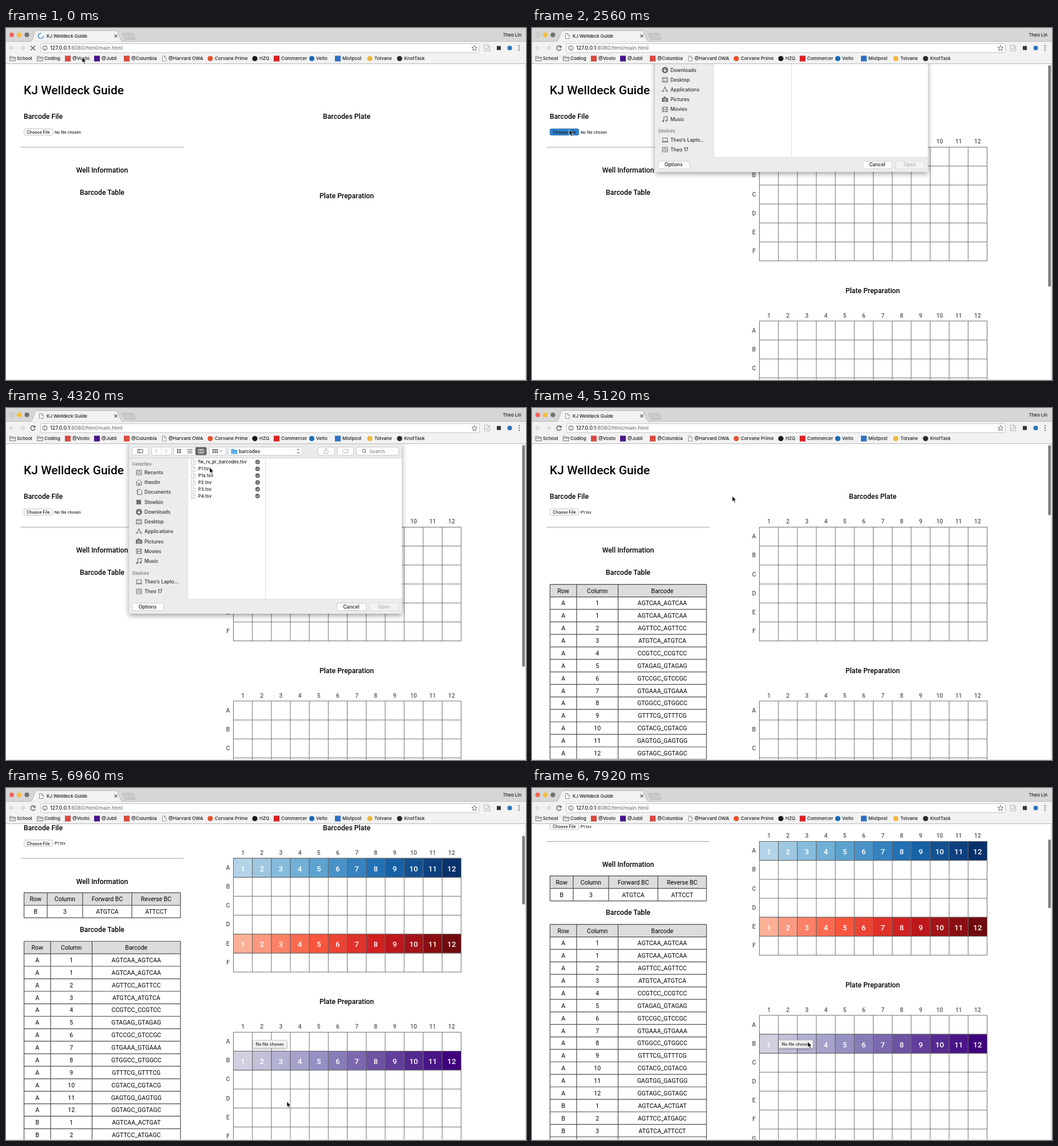
These frames come from a looping animation (909 by 616 pixels, 8000 ms). An HTML page:

```html
<!DOCTYPE html>
<html lang="en">
<head>
<meta charset="utf-8">
<title>KJ Welldeck Guide</title>
<style>
html, body { margin: 0; height: 100%; overflow: hidden; background: #fff; }
svg { display: block; width: 909px; height: 616px; }
text { font-family: Inter, "Open Sans", sans-serif; white-space: pre; }
.page { font-family: Roboto, sans-serif; }
.mid { text-anchor: middle; }
.end { text-anchor: end; }
</style>
</head>
<body>
<svg id="stage" viewBox="0 0 909 616"></svg>
<script>
const LOOP = 8000;
const LOADED = 400, PRESS = 2320, OPEN = 2400, LISTED = 2800, CLOSE = 4560,
      PARSED = 4880, TIP = 5760, PICK = 6120;

// ---- drawing helpers ----
const text = (x, y, s, size, cls = '', fill = '#1c1c1c', weight = 500) =>
  `<text x="${x}" y="${y}" class="${cls}" font-size="${size}" fill="${fill}" font-weight="${weight}">${s}</text>`;
const rect = (x, y, w, h, fill, stroke = 'none', r = 0) =>
  `<rect x="${x}" y="${y}" width="${w}" height="${h}" rx="${r}" fill="${fill}" stroke="${stroke}"/>`;
const path = (d, stroke, width = 1, fill = 'none') =>
  `<path d="${d}" stroke="${stroke}" stroke-width="${width}" fill="${fill}"/>`;
const circle = (x, y, r, fill, stroke = 'none') =>
  `<circle cx="${x}" cy="${y}" r="${r}" fill="${fill}" stroke="${stroke}"/>`;
const group = (id, body) => `<g id="${id}">${body}</g>`;
const heading = (x, y, s, cls = 'page mid') => text(x, y, s, 12.25, cls, '#000');
const folder = (x, y, fill, stroke) =>
  path(`M${x} ${y}v-8h4l1 1.5h5v6.5zM${x} ${y - 5}h10`, stroke, 0.8, fill);
const sheetOfPaper = (x, y, w, h, stroke = '#777') =>
  path(`M${x} ${y}h${w - 3}l3 3v${h - 3}h${-w}zM${x + w - 3} ${y}v3h3`, stroke, 0.8, '#fff');

// ---- plates ----
const PITCH = 33.17, LEFT = 397.5;
const BLUES = [[180, 211, 232], [98, 168, 211], [28, 108, 178], [8, 48, 107]];
const REDS = [[253, 176, 150], [252, 92, 64], [205, 26, 30], [112, 10, 14]];
const PURPLES = [[208, 208, 224], [155, 152, 198], [104, 76, 160], [63, 0, 125]];

function ramp(stops, i) {
  const p = i / 11 * 3, k = Math.min(2, Math.floor(p)), f = p - k;
  return `rgb(${stops[k].map((c, j) => Math.round(c + (stops[k + 1][j] - c) * f))})`;
}

function plate(top, rows) {
  let s = '', d = '';
  for (let c = 0; c <= 12; c++) {
    d += `M${LEFT + c * PITCH} ${top}v${rows * PITCH}`;
    if (c < 12) s += text(LEFT + (c + 0.5) * PITCH, top - 6.3, c + 1, 10.3, 'page mid', '#555');
  }
  for (let r = 0; r <= rows; r++) {
    d += `M${LEFT} ${top + r * PITCH}h${12 * PITCH}`;
    if (r < rows) s += text(388, top + r * PITCH + 19.8, 'ABCDEFGH'[r], 10.3, 'page mid', '#555');
  }
  return s + path(d, '#707070');
}

function wells(top, row, stops) {
  let s = '';
  for (let c = 0; c < 12; c++) {
    const x = LEFT + c * PITCH, y = top + row * PITCH;
    s += rect(x, y, PITCH, PITCH, ramp(stops, c), '#666') +
      text(x + PITCH / 2, y + 22.6, c + 1, 13.4, 'page mid', '#fff');
  }
  return s;
}

// ---- tables ----
const ROW = 21.87;

function table(top, edges, rows, count = rows.length) {
  const right = edges[edges.length - 1];
  let s = rect(edges[0], top, right - edges[0], ROW, '#dcdcdf'), d = '';
  for (const x of edges) d += `M${x} ${top}v${count * ROW}`;
  for (let r = 0; r <= count; r++) d += `M${edges[0]} ${top + r * ROW}H${right}`;
  rows.forEach((row, r) => row.forEach((v, c) => {
    s += text((edges[c] + edges[c + 1]) / 2, top + r * ROW + 14.9, v, 10.55, 'page mid', '#000', 400);
  }));
  return s + path(d, '#4c4c4c', 1.2);
}

const codes = ('AGTCAA AGTTCC ATGTCA CCGTCC GTAGAG GTCCGC GTGAAA GTGGCC ' +
  'GTTTCG CGTACG GAGTGG GGTAGC').split(' ');
const barcodes = [
  ['Row', 'Column', 'Barcode'],
  ['A', 1, 'AGTCAA_AGTCAA'],
  ...codes.map((c, i) => ['A', i + 1, c + '_' + c]),
  ...['ACTGAT', 'ATGAGC', 'ATTCCT'].map((c, i) => ['B', i + 1, codes[i] + '_' + c])
];

// ---- page ----
const page =
  text(31, 116, 'KJ Welldeck Guide', 21, 'page', '#000') +
  heading(31, 159, 'Barcode File', 'page') +
  heading(595.5, 159, 'Barcodes Plate') +
  `<rect id="choose" x="31.5" y="176.5" width="50" height="11" rx="2"/>` +
  text(56.5, 185, 'Choose File', 7.2, 'mid', '#111') +
  `<text id="file" x="85" y="184.8" font-size="6.7" font-weight="500" fill="#111"></text>` +
  path('M25.5 208.5H310.5', '#a6a6a6') +
  heading(168, 253, 'Well Information') +
  group('prep', heading(595.5, 298, 'Plate Preparation')) +
  group('plates', plate(208.5, 6) + plate(512.8, 8)) +
  group('picked',
    wells(208.5, 0, BLUES) + wells(208.5, 4, REDS) + wells(512.8, 1, PURPLES) +
    table(268.8, [31.5, 72, 134, 220, 305],
      [['Row', 'Column', 'Forward BC', 'Reverse BC'], ['B', 3, 'ATGTCA', 'ATTCCT']])) +
  group('codes', heading(168, 292, 'Barcode Table') +
    group('rows', table(308.7, [31.5, 78, 150.5, 305], barcodes, 24)));

// ---- file sheet ----
const G = '#6c6c6c';
const button = (x, y, w, h) => rect(x + 0.5, y + 0.5, w, h, '#fdfdfd', '#cfcfcf', 2.5);
const box = (y, d) => path(`M228 ${y - 4}h9v8h-9z` + d, G, 1);
const places = [
  ['Recents', y => box(y, `M228 ${y + 1}h9M230 ${y - 2}h5`)],
  ['theolin', y => path(`M227 ${y}l5.5 -5l5.5 5M228.5 ${y - 1}v6h8v-6M231.5 ${y + 5}v-4h2v4`, G)],
  ['Documents', y => path(`M227.5 ${y - 3}h2v7h5M230 ${y - 5}h5l2.5 3v6h-7.5z`, G)],
  ['Stowbin', y => rect(228, y - 4, 8, 8, G)],
  ['Downloads', y => circle(232.5, y, 5.5, G) + path(`M232.5 ${y - 3}v5.5M230 ${y}l2.5 2.5l2.5 -2.5`, '#fff', 1.2)],
  ['Desktop', y => box(y, `M228 ${y - 2}h9M228 ${y + 2}h9`)],
  ['Applications', y => path(`M228.5 ${y + 4}l4 -9l4 9M226.5 ${y + 2}h4M233 ${y + 2}h5`, G, 1.1)],
  ['Pictures', y => rect(227, y - 3, 11, 7, G, 'none', 1) + rect(230, y - 5, 4, 3, G) + circle(232.5, y + 0.5, 2, 'none', '#eee')],
  ['Movies', y => box(y, `M230 ${y - 4}v8M235 ${y - 4}v8M230 ${y}h5`)],
  ['Music', y => path(`M230.5 ${y + 3}v-7l6 -1v7`, G, 1.2) + circle(229.3, y + 3.2, 1.7, G) + circle(235.3, y + 2.3, 1.7, G)]
];
const devices = [
  ['Theo’s Lapto...', y => path(`M228.5 ${y - 3}h8v6h-8zM226.5 ${y + 4}h12`, G)],
  ['Theo 17', y => box(y, `M228 ${y + 1}h9M230 ${y - 2}h5`)]
];
const sideList = (items, top) => items.map(([name, icon], i) => {
  const y = top + i * 17.22;
  return icon(y) + text(242, y + 3, name, 8.5, '', '#333');
}).join('');

const files = ['fw_rv_pr_barcodes', 'P1', 'P1a', 'P2', 'P3', 'P4'].map((name, i) => {
  const y = 94.5 + i * 11.9;
  return sheetOfPaper(323.5, y - 4.5, 7.5, 9, '#bbb') +
    path(`M325 ${y - 1}h4M325 ${y + 1}h4M325 ${y + 3}h4`, '#ccc', 0.6) +
    text(336, y + 2.9, name + '.tsv', 7.8) + circle(439.8, y, 4, '#6a6a6a') +
    path(`M438 ${y}l1.5 1.5l2.3 -3`, '#fff', 0.9);
}).join('');

const sheet =
  `<rect x="215" y="60" width="477" height="300" fill="#ececec" filter="url(#shadow)"/>` +
  rect(215, 64, 477, 24, '#eaeaea') + rect(318, 88, 374, 247, '#fff') +
  path('M215 87.5H692', '#d2d2d2') +
  path('M317.5 88V335M453.5 88V335M318 334.5H692', '#dedede') +
  button(220, 68, 28, 14) + path('M230 72.5h9v6h-9zM233 72.5v6', '#555') +
  button(254, 68, 35, 14) + path('M271.5 69v13', '#ddd') +
  path('M264.5 72.5l-3 3l3 3M278.5 72.5l3 3l-3 3', '#999') +
  button(293, 68, 57, 14) + rect(331, 68.5, 19.5, 14, '#666', 'none', 2) +
  [299, 303].map(x => [72, 76].map(y => rect(x, y, 2.7, 2.7, '#555')).join('')).join('') +
  path('M317 72.5h9M317 75.5h9M317 78.5h9', '#555') +
  path('M336.5 72.5h9v6.5h-9zM339.5 72.5v6.5M342.5 72.5v6.5', '#fff', 0.9) +
  button(355, 68, 29, 14) +
  [361, 364.5, 368].map(x => [72, 76].map(y => rect(x, y, 2.4, 2.8, '#555')).join('')).join('') +
  path('M374 74.5l2 2l2 -2', '#555') +
  button(388, 68, 129, 14) + folder(394, 80, '#62b4e8', '#4b9bd0') +
  text(407, 78.7, 'barcodes', 8.3) +
  path('M509 74l2 -2.2l2 2.2M509 77l2 2.2l2 -2.2', '#444') +
  button(545, 68, 29, 14) + path('M557.5 74h-1.5v5.5h7v-5.5h-1.5M559.5 77v-6.5l-2 2M559.5 70.5l2 2', '#aaa', 0.9) +
  button(579, 68, 28, 14) + path('M588 75.5l2.5 -3h7.5v6h-7.5z', '#aaa', 0.9) +
  button(612, 68, 74, 14) + circle(626, 75, 2.7, 'none', '#666') + path('M628 77l2 2.2', '#666') +
  text(635, 78.5, 'Search', 8.2, '', '#888') +
  text(221, 101, 'Favorites', 7.5, '', '#808080', 600) + sideList(places, 113) +
  text(221, 291.7, 'Devices', 7.5, '', '#808080', 600) + sideList(devices, 303.8) +
  button(220, 341, 55, 13) + text(247.5, 350.6, 'Options', 8.5, 'mid') +
  button(578, 341, 51, 13) + text(603.5, 350.6, 'Cancel', 8.5, 'mid') +
  rect(635.5, 341.5, 50, 13, '#f3f3f3', '#dedede', 2.5) + text(660.5, 350.6, 'Open', 8.5, 'mid', '#b0b0b0') +
  group('files', files);

// ---- browser frame ----
const dot = (x, fill) => circle(x, 53.5, 4.6, fill);
const block = (x, fill) => rect(x - 5, 48.5, 10, 10, fill);
const marks = [
  [19, 'School', folder(6.5, 57.5, '#e4e4e4', '#666')],
  [67, 'Coding', folder(54.5, 57.5, '#e4e4e4', '#666')],
  [116, '@Vosto', block(108, '#d84a3e')],
  [167, '@Jubli', block(159, '#4a148c')],
  [219, '@Columbia', block(211, '#d84a3e')],
  [284, '@Harvard OWA', sheetOfPaper(273.5, 49, 6.5, 9)],
  [365, 'Corvane Prime', dot(357, '#e8502c')],
  [443, 'HZQ', dot(435, '#1a1a1a')],
  [481, 'Commercer', block(473, '#dc2222')],
  [542, 'Velto', dot(534.5, '#1b6cb5')],
  [588, 'Mistpost', block(580, '#2f72c4')],
  [644, 'Tolvane', dot(636, '#f0b83c')],
  [696, 'KnotTask', dot(688, '#2a2a2a')]
].map(([x, s, icon]) => icon + text(x, 56.4, s, 8.1)).join('');

const frame =
  rect(0, 0, 909, 24, '#d6d6d6') + rect(0, 23.5, 909, 39, '#f2f2f2') +
  path('M0 23.5H909', '#bcbcbc') + path('M0 62.5H909', '#b9b9b9') +
  path('M42 24C48 23 49 4.5 54 4.5H192C197 4.5 198 23 205 24z', '#b0b0b0', 0.9, '#f2f2f2') +
  path('M43 24.2H204', '#f2f2f2', 1.4) +
  path('M204 9.5h16q2 0 3 3l2.5 7h-16q-2 0 -3 -3z', '#aaa', 0.8, '#cbcbcb') +
  `<circle id="shut" cx="10" cy="12" r="4"/>` + circle(23, 12, 4, '#f8bd3c') + circle(36.5, 12, 4, '#707070') +
  `<path id="spin" d="M65.5 14A4.6 4.6 0 1 1 61.5 9.2" fill="none" stroke="#4b90cf" stroke-width="1.5"/>` +
  group('tabIcon', sheetOfPaper(58.5, 9.5, 6.5, 9)) +
  text(71, 16.7, 'KJ Welldeck Guide', 7.9) +
  path('M189.5 11.5l5 5m0 -5l-5 5', '#555', 1.1) +
  text(901, 14.6, 'Theo Lin', 7.9, 'end') +
  path('M14.5 35H6M10 31l-4 4l4 4M24 35h8.5M28.5 31l4 4l-4 4', '#cfcfcf', 1.3) +
  group('stop', path('M43 31l8 8m0 -8l-8 8', '#555', 1.3)) +
  group('reload', path('M50.5 33A4 4 0 1 0 51 36.5', '#555', 1.3) + path('M51.5 30.5v4h-4z', 'none', 0, '#555')) +
  rect(60.5, 27.5, 767, 15.5, '#fff', '#c4c4c4', 2) +
  circle(68, 35, 4, 'none', '#555') + path('M68 34.5v3M68 32.3v1.2', '#555', 1.1) +
  text(77, 38.3, '127.0.0.1<tspan fill="#777">:8080/html/main.html</tspan>', 8.9) +
  path('M819 30.5l1.3 3.1l3.3 .3l-2.5 2.2l.8 3.2l-2.9 -1.7l-2.9 1.7l.8 -3.2l-2.5 -2.2l3.3 -.3z', '#555', 0.9) +
  sheetOfPaper(836.5, 30, 9, 10, '#999') + path('M838 35h6M838 37h6', '#aaa', 0.9) +
  rect(858, 31.5, 7, 7, '#333') + circle(880.5, 35, 4, '#2c74b8') +
  [31, 35, 39].map(y => circle(897, y, 1.1, '#555')).join('') + marks;

const tooltip = `<g filter="url(#soft)">${rect(431.5, 441.5, 59.5, 13.5, '#f1f1f1', '#cacaca', 1)}</g>` +
  text(461.2, 451, 'No file chosen', 7.1, 'mid');

document.getElementById('stage').innerHTML =
  `<defs><filter id="shadow" x="-10%" y="-10%" width="120%" height="125%">
    <feDropShadow dx="0" dy="3" stdDeviation="5" flood-opacity=".4"/></filter>
    <filter id="soft" x="-20%" y="-50%" width="140%" height="220%">
    <feDropShadow dx="0" dy="1.5" stdDeviation="1.5" flood-opacity=".3"/></filter></defs>` +
  group('page', page) +
  `<rect id="thumb" x="902.3" width="4.8" rx="2.4" fill="#7f7f7f"/>` +
  path('M908.5 63V616', '#c4c4c4') + path('M0 615.5H909', '#dedede') +
  group('sheet', sheet) + frame + group('tip', tooltip) +
  group('cursor', path('M0 0V9.8L2.2 7.8L3.9 11.6L5.6 10.9L4 7.2H7z', '#fff', 0.8, '#000'));

// ---- motion ----
const $ = {};
document.querySelectorAll('#stage [id]').forEach(el => $[el.id] = el);
const show = (el, on) => el.style.display = on ? '' : 'none';
const move = (el, x, y) => el.setAttribute('transform', `translate(${x} ${y})`);
const ease = (t, from, to) => {
  const p = Math.min(1, Math.max(0, (t - from) / (to - from)));
  return p * p * (3 - 2 * p);
};

// time, x, y
const trail = [
  [700, 133, 51], [1900, 65, 178], [2800, 65, 178], [3520, 356, 104], [4500, 356, 104],
  [5040, 350, 154], [5200, 350, 154], [5800, 432, 420], [6100, 491, 547], [6600, 491, 547],
  [7120, 491, 549], [7400, 491, 549], [7840, 482, 444]
];

function pointer(t) {
  let [, x, y] = trail[0];
  for (let i = 1; i < trail.length; i++) {
    const a = trail[i - 1], b = trail[i], p = ease(t, a[0], b[0]);
    x += (b[1] - a[1]) * p;
    y += (b[2] - a[2]) * p;
  }
  return [x, y];
}

function draw(t) {
  const loaded = t >= LOADED, parsed = t >= PARSED, picked = t >= PICK;
  const modal = t >= OPEN && t < CLOSE + 240;
  const pressed = t >= PRESS && t < LISTED;
  const scroll = 115 * ease(t, 6560, 7160);

  show($.spin, !loaded);
  show($.stop, !loaded);
  show($.tabIcon, loaded);
  show($.reload, loaded);
  $.spin.setAttribute('transform', `rotate(${t * 0.45} 61.5 13.7)`);

  move($.page, 0, -scroll);
  move($.prep, 0, loaded ? 165.5 : 0);
  show($.plates, loaded);
  show($.picked, picked);
  show($.rows, parsed);
  move($.codes, 0, picked ? 45 : 0);
  $.file.textContent = parsed ? 'P1.tsv' : 'No file chosen';
  $.choose.setAttribute('fill', pressed ? '#2f83cc' : '#fdfdfd');
  $.choose.setAttribute('stroke', pressed ? '#2a6fae' : '#c2c2c2');

  show($.thumb, loaded);
  $.thumb.setAttribute('y', 65 + scroll * 25 / 115);
  $.thumb.setAttribute('height', picked ? 120.5 : parsed ? 123 : 388);

  show($.sheet, modal);
  show($.files, t >= LISTED);
  move($.sheet, 0, -303 * (1 - ease(t, OPEN, OPEN + 270) + ease(t, CLOSE, CLOSE + 240)));
  $.shut.setAttribute('fill', modal ? '#d0d0d0' : '#f9605a');
  $.shut.setAttribute('stroke', modal ? '#c0c0c0' : 'none');

  show($.tip, t >= TIP);
  move($.cursor, ...pointer(t));
}

const start = performance.now();
function tick() {
  draw((performance.now() - start) % LOOP);
  requestAnimationFrame(tick);
}
tick();
</script>
</body>
</html>
```
